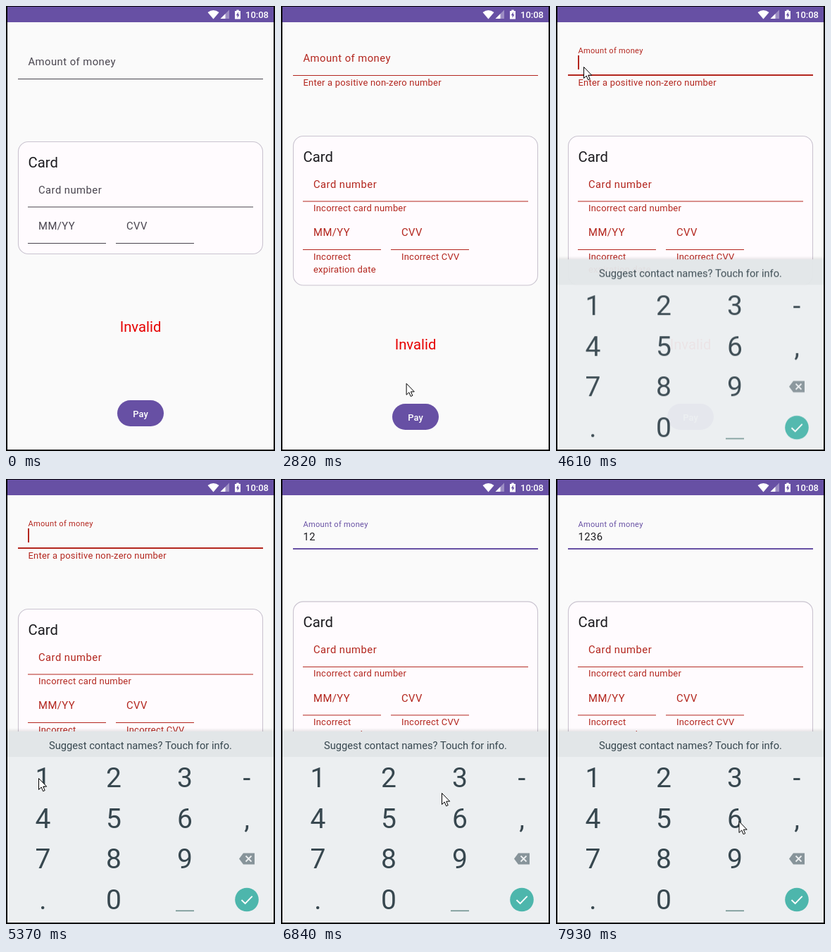
An HTML page for the animation above (8000 ms loop, 382x631 px).

```html
<!DOCTYPE html>
<html lang="en">
<head>
<meta charset="utf-8">
<title>Payment form</title>
<style>
  html, body { margin: 0; width: 100%; height: 100%; overflow: hidden; background: #000; }
  svg { display: block; width: 100%; height: 100%; font-family: Roboto, sans-serif; }
  .body { font-size: 14.8px; letter-spacing: .46px; }
  .note { font-size: 12.95px; letter-spacing: .23px; }
  .big { font-size: 20.3px; }
  .keys { font-size: 39px; fill: #37474f; text-anchor: middle; }
</style>
</head>
<body>
<svg viewBox="0 0 382 631" xmlns="http://www.w3.org/2000/svg">
  <defs>
    <clipPath id="screen"><rect x="2" y="1" width="378" height="628"/></clipPath>
    <linearGradient id="shade" x1="0" y1="0" x2="0" y2="1">
      <stop offset="0" stop-color="#000" stop-opacity="0"/>
      <stop offset="1" stop-color="#000" stop-opacity=".09"/>
    </linearGradient>
  </defs>
  <rect width="382" height="631"/>
  <rect x="2" y="1" width="378" height="628" fill="#fafafa"/>

  <g id="status">
    <rect x="2" y="1" width="378" height="22" fill="#6750a4"/>
    <path d="M286.5 9Q294.500 3 302.500 9L294.500 18.500Z" fill="#fff"/>
    <path d="M317 5.500V18H304.500Z" fill="#fff" opacity=".35"/>
    <path d="M311.500 11V18H304.500Z" fill="#fff"/>
    <path d="M327.300 5.500H330.700V7H333V18.500H325V7H327.300Z" fill="#fff"/>
    <path d="M329.800 8.500L326.800 13.300H328.600V17L331.400 12H329.800Z" fill="#6750a4"/>
    <text x="340" y="17" font-size="13" font-weight="500" fill="#fff">10:08</text>
  </g>

  <g clip-path="url(#screen)">
    <text id="amount" x="31.500"></text>
    <text id="value" class="body" x="31.500" y="87" fill="#1c1b1f"></text>
    <rect id="caret" y="70" width="2" height="20"/>
    <rect id="amountLine" x="17" width="348"/>
    <text id="amountNote" class="note error" x="31.500" y="112.500" fill="#b3261e">Enter a positive non-zero number</text>

    <g id="card">
      <rect id="cardBox" x="17.500" y="0" width="347" rx="14" fill="#fffbfe" stroke="#cac4d0" stroke-width="1.100"/>
      <text class="big" x="31.500" y="36.300" fill="#1c1b1f">Card</text>
      <text class="body tint" x="46" y="73.500">Card number</text>
      <rect class="tint" x="31" y="92" width="320" height="1"/>
      <text class="note error" x="46" y="106.500" fill="#b3261e">Incorrect card number</text>
      <g id="row">
        <text class="body tint" x="46" y="124.800">MM/YY</text>
        <rect class="tint" x="31" y="143.500" width="111" height="1"/>
        <text class="body tint" x="171" y="124.800">CVV</text>
        <rect class="tint" x="156" y="143.500" width="111" height="1"/>
        <g class="note error" fill="#b3261e">
          <text x="46" y="158">Incorrect</text>
          <text x="46" y="176.500">expiration date</text>
          <text x="171" y="158">Incorrect CVV</text>
        </g>
      </g>
    </g>

    <text id="invalid" class="big" x="191" text-anchor="middle" fill="#e60000">Invalid</text>
    <g id="pay">
      <rect x="158" y="559" width="66" height="37" rx="18.500" fill="#6750a4"/>
      <text x="191" y="583" font-size="12.950" font-weight="500" letter-spacing=".1" text-anchor="middle" fill="#fff">Pay</text>
    </g>

    <g id="keyboard">
      <rect x="2" y="353" width="378" height="5" fill="url(#shade)"/>
      <rect x="2" y="358" width="378" height="300" fill="#eceff1"/>
      <rect x="2" y="358" width="378" height="36" fill="#e2e6e8"/>
      <text x="191" y="383" font-size="14.700" fill="#37474f" text-anchor="middle">Suggest contact names? Touch for info.</text>
      <rect id="press" width="94" height="42" rx="2" fill="#cfd8dc"/>
      <g id="keys" class="keys"></g>
      <rect x="241" y="611.500" width="26" height="1.600" fill="#71928f"/>
      <path d="M337 530.500H353V546.500H337L331 538.500Z" fill="#87949a"/>
      <path d="M340.500 534.500L348.500 542.500M348.500 534.500L340.500 542.500" stroke="#eceff1" stroke-width="1.800"/>
      <circle cx="342" cy="596.500" r="16.800" fill="#4db6ac"/>
      <path d="M334.500 597L339.700 602L349.700 591.700" fill="none" stroke="#fff" stroke-width="1.900"/>
    </g>
  </g>

  <g id="cursor">
    <circle id="halo" r="12" fill="#f7ec10" opacity=".58"/>
    <path d="M.5 .5V16.500L4.200 13L6.600 18.700L9.200 17.600L6.800 12.100H11.700Z" fill="#fff" stroke="#000" stroke-linejoin="round"/>
  </g>
</svg>
<script>
const LOOP = 8000;
const SHOW_ERRORS = 2080, FOCUS = 4250, VALID = 5765;
const GREY = [73, 69, 79], RED = [179, 38, 30], PURPLE = [103, 80, 164];

const $ = id => document.getElementById(id);
const all = sel => document.querySelectorAll(sel);
const clamp = v => Math.max(0, Math.min(1, v));
const smooth = p => p * p * (3 - 2 * p);
const ramp = (t, from, length) => smooth(clamp((t - from) / length));
const mix = (a, b, p) => a + (b - a) * p;
const blend = (a, b, p) => `rgb(${a.map((v, i) => Math.round(mix(v, b[i], p)))})`;
const within = (t, spans) => spans.some(([a, b]) => t >= a && t < b);
const show = (node, on) => node.setAttribute('visibility', on ? 'visible' : 'hidden');
const set = (node, attrs) => { for (const k in attrs) node.setAttribute(k, attrs[k]); };

// time, x, y, steady speed towards this point
const path = [
  [390, 305, 634], [800, 181, 575], [1070, 181, 575], [1130, 192, 578],
  [2680, 192, 578], [3440, 33, 101], [3510, 33, 101], [3850, 39, 86],
  [4950, 39, 86], [5370, 46, 424], [5580, 46, 424], [5710, 132, 424, 1],
  [5780, 140, 423, 1], [5880, 147, 424, 1], [6160, 147, 424], [6360, 160, 464],
  [6560, 188, 478, 1], [6840, 228, 445, 1], [6960, 248, 427], [7120, 248, 427],
  [7390, 262, 481], [7460, 259.5, 485]
];
const halos = [[1940, 2150], [4130, 4340], [5420, 5560], [5920, 6100], [6980, 7110], [7730, 7900]];
const carets = [[4350, 4800], [5250, 6080], [6150, 6600], [7040, 7390]];
// typed digit, time, key column, key row
const typed = [['1', 5560, 0, 0], ['2', 6080, 1, 0], ['3', 7040, 2, 0], ['6', 7790, 2, 1]];

['123-', '456,', '789 ', '.0'].forEach((line, r) => [...line].forEach((ch, c) => {
  const key = document.createElementNS('http://www.w3.org/2000/svg', 'text');
  set(key, { x: [52.5, 153, 254, 342][c], y: 437 + r * 57.7 });
  key.textContent = ch;
  $('keys').append(key);
}));

function pointer(t) {
  const i = path.findIndex(p => p[0] > t);
  if (i < 0) return path[path.length - 1].slice(1, 3);
  const a = path[i - 1] || path[0], b = path[i];
  const p = clamp((t - a[0]) / (b[0] - a[0] || 1));
  const q = b[3] ? p : smooth(p);
  return [mix(a[1], b[1], q), mix(a[2], b[2], q)];
}

function drawForm(t) {
  const wrong = t >= SHOW_ERRORS, valid = t >= VALID;
  const red = ramp(t, SHOW_ERRORS, 150), focus = ramp(t, FOCUS, 150);
  const fieldColor = blend(GREY, RED, red);
  const amountColor = valid ? blend(RED, PURPLE, ramp(t, VALID + 30, 180)) : fieldColor;

  const label = $('amount');
  label.textContent = 'Amount of money';
  set(label, {
    y: mix(wrong ? 79 : 84, valid ? 68 : 67, focus),
    'font-size': mix(14.8, 11.1, focus),
    'letter-spacing': mix(.46, .27, focus),
    fill: amountColor
  });
  const thick = mix(1, 2, focus);
  set($('amountLine'), { y: (valid ? 100 : wrong ? 99 : 104) - thick, height: thick, fill: amountColor });

  const text = typed.filter(k => t >= k[1]).map(k => k[0]).join('');
  $('value').textContent = text;
  set($('caret'), { x: 31 + text.length * 8.77, fill: amountColor });
  show($('caret'), within(t, carets));

  all('.error').forEach(n => show(n, wrong));
  show($('amountNote'), wrong && !valid);
  all('.tint').forEach(n => n.setAttribute('fill', fieldColor));
  const shift = valid ? -10.6 : 0;
  set($('card'), { transform: `translate(0 ${(wrong ? 184.5 : 192.5) + shift})` });
  set($('cardBox'), { height: wrong ? 211.5 : 159 });
  set($('row'), { transform: `translate(0 ${wrong ? 17 : 0})` });
  set($('invalid'), { y: (wrong ? 487 : 461.5) + shift });
  set($('pay'), { transform: `translate(0 ${wrong ? 5 : 0})` });
}

function drawKeyboard(t) {
  const p = clamp((t - 4380) / 290), out = 1 - (1 - p) ** 2;
  set($('keyboard'), { opacity: out, transform: `translate(0 ${30 * (1 - out)})` });
  show($('keyboard'), p > 0);
  const key = typed.find(k => t >= k[1] - 60 && t < k[1] + 130);
  set($('press'), key
    ? { x: 5 + key[2] * 101, y: 402 + key[3] * 58, opacity: 1 - ramp(t, key[1] + 20, 110) }
    : { opacity: 0 });
}

function draw(t) {
  drawForm(t);
  drawKeyboard(t);
  const [x, y] = pointer(t);
  set($('cursor'), { transform: `translate(${x} ${y})` });
  show($('cursor'), t > 390);
  set($('halo'), { opacity: within(t, halos) ? .58 : 0 });
}

const start = performance.now();
function tick() {
  draw((performance.now() - start) % LOOP);
  requestAnimationFrame(tick);
}
tick();
</script>
</body>
</html>
```
